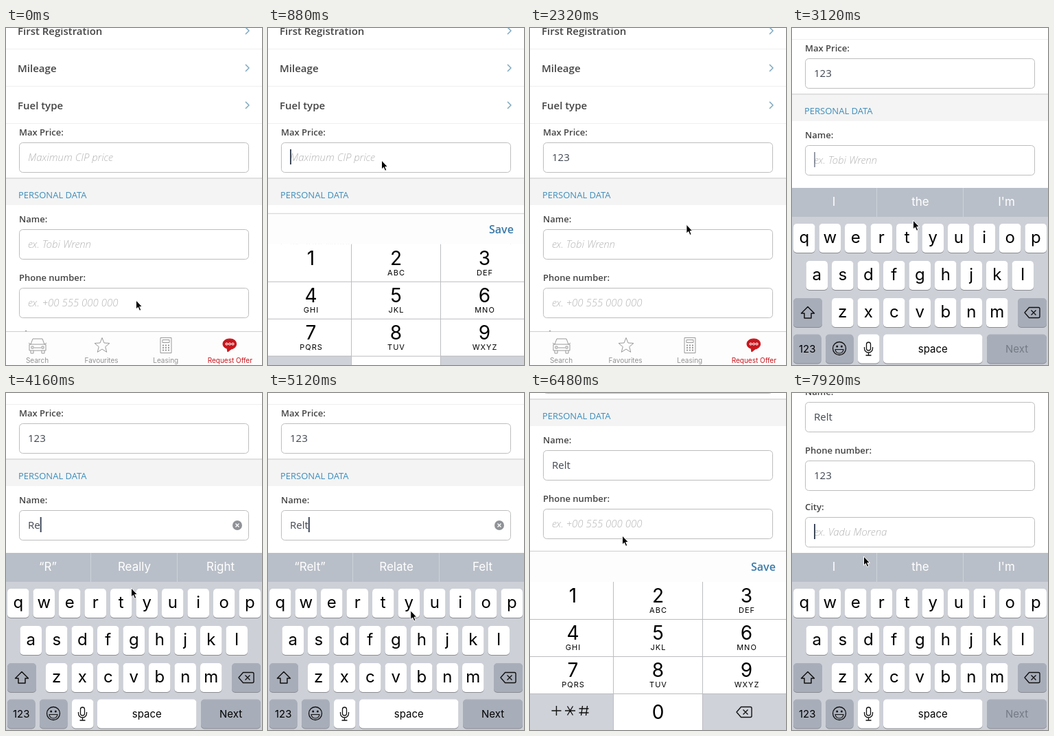
Animation of 373 by 489 pixels, one loop 8 s. Source, as an HTML page with a canvas:

```html
<!DOCTYPE html>
<html lang="en">
<head>
<meta charset="utf-8">
<title>Offer form</title>
<style>
  html, body { margin: 0; width: 100%; height: 100%; overflow: hidden; background: #fff; }
  canvas { display: block; width: 373px; height: 489px; }
</style>
</head>
<body>
<canvas id="stage"></canvas>
<script>
const W = 373, H = 489, LOOP = 8000;
const canvas = document.getElementById('stage');
const ctx = canvas.getContext('2d');
const dpr = window.devicePixelRatio || 1;
canvas.width = W * dpr;
canvas.height = H * dpr;

const page = '"Open Sans", sans-serif';
const system = 'Inter, sans-serif';

// Eased value at time t from [time, value] stops
function track(t, stops) {
  if (t <= stops[0][0]) return stops[0][1];
  for (let i = 1; i < stops.length; i++) {
    const [t1, v1] = stops[i];
    if (t < t1) {
      const [t0, v0] = stops[i - 1];
      const u = (t - t0) / (t1 - t0);
      return v0 + (v1 - v0) * u * u * (3 - 2 * u);
    }
  }
  return stops[stops.length - 1][1];
}

// Latest value whose start time has passed
const latest = (t, steps) => steps.reduce((v, s) => t >= s[0] ? s[1] : v, steps[0][1]);

function text(s, x, y, font, color, align = 'left', spacing = 0) {
  ctx.font = font;
  ctx.fillStyle = color;
  ctx.textAlign = align;
  ctx.letterSpacing = spacing + 'px';
  ctx.fillText(s, x, y);
}

function rect(x, y, w, h, color) {
  ctx.fillStyle = color;
  ctx.fillRect(x, y, w, h);
}

function roundRect(x, y, w, h, r) {
  ctx.beginPath();
  ctx.roundRect(x, y, w, h, r);
}

function stroke(d, color, width = 1, fill) {
  const path = new Path2D(d);
  if (fill) { ctx.fillStyle = fill; ctx.fill(path); }
  ctx.strokeStyle = color;
  ctx.lineWidth = width;
  ctx.lineJoin = 'round';
  ctx.stroke(path);
}

function disc(x, y, r, color) {
  ctx.beginPath();
  ctx.arc(x, y, r, 0, 7);
  ctx.fillStyle = color;
  ctx.fill();
}

function at(x, y, draw) {
  ctx.save();
  ctx.translate(x, y);
  draw();
  ctx.restore();
}

// ---- Timeline ----

const typed = {
  price: [[0, ''], [1040, '1'], [1120, '12'], [1200, '123']],
  name: [[0, ''], [3920, 'R'], [4080, 'Re'], [4480, 'Rel'], [4800, 'Relt']],
  phone: [[0, ''], [6720, '1'], [6800, '12'], [6880, '123']],
  city: [[0, '']]
};
const focusSteps = [[0, ''], [600, 'price'], [2080, ''], [2480, 'name'], [5680, 'phone'], [7280, ''], [7600, 'city']];
const scrollStops = [[2480, 0], [2800, 122], [5680, 122], [5896, 209], [7600, 209], [7910, 279]];
const caretStops = [[3040, 1], [3210, 0], [3680, 0], [3760, 1], [6240, 1], [6400, 0], [6719, 0], [6720, 1]];
const padStops = [[640, 260], [960, 0], [2080, 0], [2320, 260], [5679, 260], [5680, 0], [7280, 0], [7440, 260]];
const lettersStops = [[2480, 258], [2800, 0], [5679, 0], [5680, 258], [7600, 258], [7840, 0]];
const mouseX = [[80, 189], [500, 165], [1440, 165], [1880, 332], [2120, 332], [2440, 180], [2960, 180], [3120, 176],
  [3280, 182], [4960, 182], [5520, 308], [5800, 308], [6400, 134], [6960, 134], [7200, 334], [7300, 334], [7560, 104]];
const mouseY = [[80, 395], [500, 192], [1440, 192], [1880, 248], [2120, 248], [2440, 302], [2800, 290], [2960, 290],
  [3120, 279], [3280, 283], [4960, 283], [5520, 446], [5760, 444], [6400, 207], [6960, 207], [7200, 250], [7300, 250],
  [7560, 288], [7830, 288], [7920, 237]];
const suggestions = [
  [0, ['I', 'the', 'I\'m']], [4000, ['“R”', 'Really', 'Right']], [4240, ['“Re”', 'Really', 'Rest']],
  [4560, ['“Rel”', 'Really', 'Relax']], [4880, ['“Relt”', 'Relate', 'Felt']], [7000, ['I', 'the', 'I\'m']]
];

// ---- Form ----

function field(id, label, hint, labelY, top, t) {
  const value = latest(t, typed[id]);
  const focused = latest(t, focusSteps) === id;
  text(label, 19, labelY, '600 13px ' + page, '#444');
  roundRect(19.5, top + .5, 334, 43, 5);
  ctx.strokeStyle = '#bdbdbd';
  ctx.lineWidth = 1;
  ctx.stroke();
  if (value) text(value, 32, top + 27, '15px ' + page, '#3f4650');
  else text(hint, 32, top + 27, 'italic 300 15px ' + page, '#b4b4b4');
  if (!focused) return;
  ctx.font = '15px ' + page;
  ctx.globalAlpha = track(t, caretStops);
  rect(32 + ctx.measureText(value).width, top + 10, 2, 22, '#3f4a5a');
  ctx.globalAlpha = 1;
  if (value) {
    disc(337, top + 22, 7, '#8f9297');
    at(337, top + 22, () => stroke('M-2.5-2.5l5 5m0-5l-5 5', '#fff', 1.4));
  }
}

function form(t) {
  at(0, -track(t, scrollStops), () => {
    ['First Registration', 'Mileage', 'Fuel type'].forEach((label, i) => {
      const y = 4 + i * 54;
      text(label, 17, y + 6, '600 15px ' + page, '#444');
      at(349, y, () => stroke('M0-5l5 5-5 5', '#7fa9bf', 1.5));
      rect(0, y + 26, W, 1, '#efefef');
    });
    field('price', 'Max Price:', 'Maximum CIP price', 156, 166, t);
    rect(0, 217, W, 40, '#f4f4f4');
    rect(0, 217, W, 2, '#e0e0e0');
    text('PERSONAL DATA', 18, 247, '500 13px ' + page, '#3c8dba');
    field('name', 'Name:', 'ex. Tobi Wrenn', 282, 292, t);
    field('phone', 'Phone number:', 'ex. +00 555 000 000', 367, 377, t);
    field('city', 'City:', 'ex. Vadu Morena', 449, 459, t);
  });
}

function tabBar() {
  const gray = '#999', red = '#c8161d';
  rect(0, 440, W, 49, '#fdfdfd');
  rect(0, 440, W, 1, '#cfcfcf');
  at(46, 461, () => {
    stroke('M-10-2L-7-10H7L10-2M-12-2H12V7H-12ZM-10 7v4h4V7M6 7v4h4V7M-5 3H5M-13-4l3 2M13-4l-3 2', gray);
    stroke('M-9 1h3v3h-3zM6 1h3v3h-3z', gray);
  });
  at(140, 461, () => {
    let star = '';
    for (let i = 0; i < 10; i++) {
      const r = i % 2 ? 5 : 11.5, a = i * Math.PI / 5;
      star += (i ? 'L' : 'M') + Math.sin(a) * r + ' ' + -Math.cos(a) * r;
    }
    stroke(star + 'Z', gray);
  });
  at(233, 460.5, () => {
    stroke('M-8-11H8V11H-8ZM-5-8H5v4H-5Z', gray);
    for (let i = 0; i < 9; i++) rect(-5 + i % 3 * 4, -1 + (i / 3 | 0) * 3.5, 2, 2, gray);
  });
  at(326, 459, () => {
    stroke('M-4 6C-13 4-12-8 0-8S13 5 2 7L-3 11Z', red, 1, red);
    for (const x of [-4.5, 0, 4.5]) {
      disc(x, -.5, 2, '#fff');
      disc(x, -.5, 1, red);
    }
  });
  ['Search', 'Favourites', 'Leasing', 'Request Offer'].forEach((label, i) =>
    text(label, 45.5 + i * 93.6, 486, '10px ' + system, i === 3 ? red : '#929292', 'center'));
}

// ---- Keyboards ----

function deleteIcon(x, y) {
  at(x, y, () => stroke('M-11 0L-4.5-7.5H9q2 0 2 2V5.5q0 2-2 2H-4.5ZM-1.5-3.5l7 7m0-7l-7 7', '#111', 1.4));
}

function toolbar(top, pressed) {
  rect(0, top, W, 44, '#fdfdfd');
  rect(0, top - 1, W, 1, '#cfcfcf');
  ctx.globalAlpha = pressed ? .25 : 1;
  text('Save', 322, top + 28, '600 16px ' + page, '#3a7aa9');
  ctx.globalAlpha = 1;
}

function numberPad(t) {
  const symbols = t > 5000;
  const centers = [62.5, 186.5, 315.5];
  const letters = ['', 'ABC', 'DEF', 'GHI', 'JKL', 'MNO', 'PQRS', 'TUV', 'WXYZ'];
  rect(0, 274, W, 215, '#fff');
  rect(0, 436, 122, 53, '#cfd2d9');
  rect(252, 436, 121, 53, '#cfd2d9');
  letters.forEach((group, i) => {
    const x = centers[i % 3], y = 304 + (i / 3 | 0) * 54;
    text(i + 1, x, y, '28px ' + system, '#000', 'center');
    text(group, x + .5, y + 15, '11px ' + system, '#000', 'center', 1);
  });
  text('0', 186.5, 473, '28px ' + system, '#000', 'center');
  for (const y of [328, 382, 436]) rect(0, y, W, 1, '#bcbdc1');
  for (const x of [121, 251]) rect(x, 274, 1, 215, '#bcbdc1');
  deleteIcon(312, 463);
  if (symbols) at(58.5, 461, () =>
    stroke('M-27 0h14m-7-7v14M-7.5 0h15M-4-6.5l8 13M4-6.5l-8 13M13-3h14M13 3h14M18-7l-2 14M25-7l-2 14', '#111', 1.4));
}

function suggestionBar(t) {
  rect(0, 232, W, 42, '#b9bfc8');
  for (const x of [123, 249]) rect(x, 232, 1, 42, '#cdd2d9');
  latest(t, suggestions).forEach((word, i) =>
    text(word, [61, 187, 312.5][i], 257.5, '17px ' + system, '#fff', 'center'));
}

function key(x, y, w, label, size, color = '#fff', ink = '#000') {
  roundRect(x, y + 1, w, 42, 5);
  ctx.fillStyle = '#898c92';
  ctx.fill();
  roundRect(x, y, w, 42, 5);
  ctx.fillStyle = color;
  ctx.fill();
  const baseline = y + (size > 20 ? 27.5 : 26.5);
  if (label) text(label, x + w / 2, baseline, size + 'px ' + system, ink, 'center');
}

function letterKeys(t) {
  const gray = '#a8aeb9';
  const ready = latest(t, typed.name) && t < 5800;
  rect(0, 274, W, 215, '#cdd0d7');
  [['qwertyuiop', 2], ['asdfghjkl', 20.5], ['zxcvbnm', 58]].forEach(([row, x], i) =>
    [...row].forEach((c, j) => key(x + j * 37.5, 284 + i * 54, 31.5, c, 24)));
  key(2, 392, 42, '', 0, gray);
  key(329, 392, 42, '', 0, gray);
  key(2, 444.5, 40.5, '123', 15, gray);
  key(49, 444.5, 40.5, '', 0, gray);
  key(96, 444.5, 31.5, '', 0);
  key(133, 444.5, 144.5, 'space', 15);
  key(284, 444.5, 87, 'Next', 15, t > 5580 && t < 5680 ? '#fff' : gray, ready ? '#000' : '#757b86');
  at(23, 413, () => stroke('M0-8.5L9.5 1H5V8H-5V1H-9.5Z', '#111', 1.5));
  deleteIcon(350, 413);
  at(69, 465, () => {
    stroke('M-9.5 0a9.5 9.5 0 1 0 19 0a9.5 9.5 0 1 0-19 0', '#111', 1.3);
    disc(-3.3, -3, 1.5, '#111');
    disc(3.3, -3, 1.5, '#111');
    stroke('M-6 1.5H6Q5 7 0 7T-6 1.5Z', '#111', 1.2);
  });
  at(111.5, 465, () => {
    stroke('M-3-6a3 3 0 0 1 6 0V0a3 3 0 0 1-6 0Z', '#111', 1.3);
    stroke('M-6-2V0a6 6 0 0 0 12 0V-2M0 6v4M-4 10H4', '#111', 1.3);
  });
}

function keyboards(t) {
  const padOffset = track(t, padStops), lettersOffset = track(t, lettersStops);
  if (lettersOffset < 258) at(0, lettersOffset, () => {
    suggestionBar(t);
    letterKeys(t);
  });
  if (padOffset < 260) at(0, padOffset, () => {
    const swapping = t >= 5680 && t < 5807;
    if (swapping) suggestionBar(t);
    const pressed = (t >= 1920 && t < 2080) || (t >= 7200 && t < 7290);
    toolbar(t < 5680 ? 230 : track(t, [[5680, 188], [5807, 230]]), pressed);
    numberPad(t);
  });
}

function pointer(t) {
  at(track(t, mouseX), track(t, mouseY), () =>
    stroke('M.5 0V13L3.4 10.3L5.6 15.3L7.8 14.3L5.7 9.5H9.5Z', '#fff', 1, '#000'));
}

function render(t) {
  ctx.setTransform(dpr, 0, 0, dpr, 0, 0);
  rect(0, 0, W, H, '#fff');
  form(t);
  tabBar();
  keyboards(t);
  pointer(t);
}

const start = performance.now();
function frame() {
  render((performance.now() - start) % LOOP);
  requestAnimationFrame(frame);
}
frame();
</script>
</body>
</html>
```
